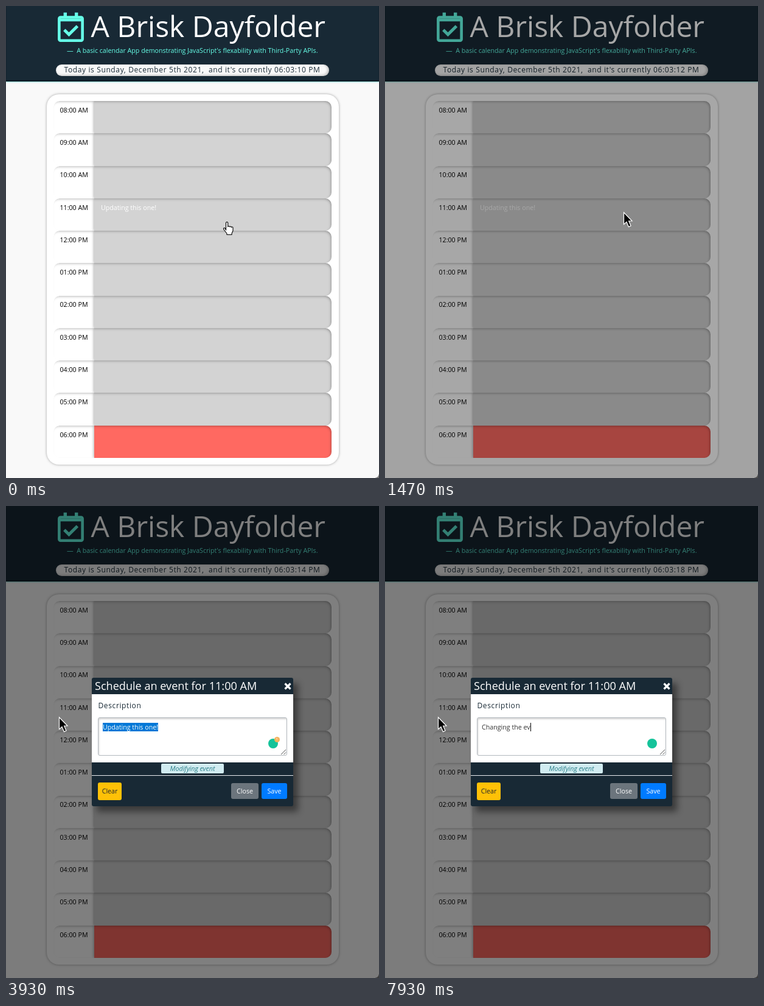
An HTML page that plays this animation: 613x775 px, repeating every 8 s.

```html
<!DOCTYPE html>
<html lang="en">
<head>
<meta charset="utf-8">
<title>A Brisk Dayfolder</title>
<style>
html, body { margin: 0; width: 100%; height: 100%; overflow: hidden; background: #f9f9f9; }
body { font: 10.667px "Open Sans", "Noto Sans", sans-serif; color: #000; }
div, .t, svg { position: absolute; box-sizing: border-box; }
.t { line-height: 0; white-space: pre; }
.mid { transform: translateX(-50%); }
.wide { letter-spacing: .62px; }
.firm { font-weight: 500; }
#stage { left: 0; top: 0; width: 613px; height: 775px; overflow: hidden; }
#head { left: 0; top: 0; width: 613px; height: 124px; background: #182935;
  box-shadow: inset 0 -2px 2px #0d1a23, 0 1px 2px #8fe3dc; }
#pill { left: 82px; top: 96px; width: 449px; height: 19px; border-radius: 10px; background: #f9f9f9;
  box-shadow: inset -2px -1px 4px rgba(0,0,0,.25); }
#card { left: 67px; top: 145px; width: 480px; height: 608px; border-radius: 20px; background: #fff;
  box-shadow: 0 0 4px rgba(0,0,0,.35); }
.row { left: 78px; width: 457px; height: 53.3px; border-radius: 10px; background: #fff; overflow: hidden; }
.slot { left: 67px; top: 0; right: 0; bottom: 0; background: #d3d3d3; box-shadow: -1px 0 4px rgba(0,0,0,.3); }
.row.now .slot { background: #ff6961; }
.edge { inset: 0; border-radius: 10px; box-shadow: inset -2px 2px 5px -2px rgba(0,0,0,.4); }
.row .t { color: #000; }
.row .memo { color: #fff; }
.row.on .t { margin: 1px 0 0 1px; color: #000; }
.row.on .edge { border: 1px solid #b4b6b6; box-shadow: none; }
#corner { right: 0; bottom: 0; width: 6px; height: 6px; background: radial-gradient(circle at 0 0, transparent 5px, #777 6px); }
#shade { inset: 0; background: #000; }
#modal { left: 141px; top: 282px; width: 331px; height: 211px; border-radius: 3px; background: #182935;
  box-shadow: 8px 9px 11px rgba(0,0,0,.45); }
#sheet { left: 0; top: 27px; width: 331px; height: 112px; background: #fff; }
#field { left: 10px; top: 65px; width: 311px; height: 63px; border: 1px solid #b3b9be; border-radius: 3px;
  box-shadow: inset 1px 2px 3px rgba(0,0,0,.18); }
#rule { left: 0; top: 160px; width: 331px; height: 1px; background: #e9ecef; }
#state { top: 141px; height: 16px; border-radius: 2px; background: #d1ecf1; }
#status { font-style: italic; }
.btn { border-radius: 3px; }
#dot { left: 289.5px; top: 99.5px; width: 16px; height: 16px; border-radius: 50%; background: #15c39a; }
#badge { left: 299.5px; top: 97px; width: 9px; height: 9px; border-radius: 50%; background: #f3b35d;
  color: #fff; font-size: 6px; line-height: 9px; text-align: center; }
#note b { font-weight: 400; color: #fff; background: #0078d7; }
#note i { position: absolute; top: -7px; width: 1px; height: 14px; background: #000; }
#cursor { left: 0; top: 0; overflow: visible; }
</style>
</head>
<body>
<div id="stage"></div>
<script>
const LOOP = 8000;
const stage = document.getElementById('stage');

function box(parent, id, cls = '') {
  const d = document.createElement('div');
  if (id) d.id = id;
  d.className = cls;
  parent.append(d);
  return d;
}

// Places text by its left edge (or centre) and baseline.
function text(parent, x, y, str, { size = 10.667, color = '', cls = '', id = '' } = {}) {
  const s = document.createElement('span');
  s.className = 't ' + cls;
  if (id) s.id = id;
  s.textContent = str;
  s.style.cssText = `left:${x}px;top:${y - size * .388}px;font-size:${size}px;` + (color && `color:${color}`);
  parent.append(s);
  return s;
}

function svg(parent, x, y, w, h, view, inner) {
  parent.insertAdjacentHTML('beforeend',
    `<svg style="left:${x}px;top:${y}px" width="${w}" height="${h}" viewBox="${view}" fill="none">${inner}</svg>`);
}

// Header
const MINT = '#66ffe8';
const head = box(stage, 'head');
svg(head, 85, 10, 43, 49, '0 0 448 512', `<g stroke="${MINT}" stroke-width="48">
  <rect x="24" y="88" width="400" height="400" rx="24"/><path d="M24 136H424"/>
  <path d="M128 8V90M320 8V90" stroke-width="56"/>
  <path d="M112 306L192 384L338 240" stroke-width="52"/></g>`);
text(head, 139.5, 52, 'A Brisk Dayfolder', { size: 48, color: '#fff' });
text(head, 100, 77, "—  A basic calendar App demonstrating JavaScript's flexability with Third-Party APIs.",
  { color: MINT, cls: 'firm' });
box(head, 'pill');
const clock = text(head, 95.5, 110, '', { size: 12, color: '#182935', cls: 'wide' });

// Hour rows
box(stage, 'card');
const rows = Array.from({ length: 11 }, (_, i) => {
  const h = i + 8;
  const row = box(stage, '', 'row' + (h === 18 ? ' now' : ''));
  row.style.top = 156 + i * 53.27 + 'px';
  box(row, '', 'slot');
  box(row, '', 'edge');
  const label = String(h > 12 ? h - 12 : h).padStart(2, '0') + ':00 ' + (h < 12 ? 'AM' : 'PM');
  text(row, 10.5, 19, label, { cls: 'firm' });
  if (h === 11) text(row, 78, 19, 'Updating this one!', { cls: 'memo' });
  return row;
});
box(stage, 'corner');

// Dialog
const shade = box(stage, 'shade');
const modal = box(stage, 'modal');
text(modal, 5, 20, 'Schedule an event for 11:00 AM', { size: 18.1, color: '#fff' });
svg(modal, 316, 8, 12, 12, '0 0 12 12', '<path d="M1.5 1.5L10.5 10.5M10.5 1.5L1.5 10.5" stroke="#fff" stroke-width="3.2"/>');
box(modal, 'sheet');
text(modal, 10.5, 51, 'Description', { size: 12, color: '#182935', cls: 'wide' });
box(modal, 'field');
svg(modal, 310, 117, 10, 10, '0 0 10 10', '<path d="M1 9L9 1M5.5 9L9 5.5" stroke="#555"/>');
const note = text(modal, 18, 85, '', { id: 'note' });
const dot = box(modal, 'dot');
const badge = box(modal, 'badge');
badge.textContent = '1';
const state = box(modal, 'state');
const status = text(modal, 165.5, 153, '', { id: 'status', cls: 'mid' });
box(modal, 'rule');

function button(x, y, w, h, label, bg, color) {
  const b = box(modal, '', 'btn');
  b.style.cssText = `left:${x}px;top:${y}px;width:${w}px;height:${h}px;background:${bg}`;
  text(modal, x + w / 2, 190, label, { color, cls: 'mid' });
}
button(10, 172, 39, 29, 'Clear', '#ffc107', '#212529');
button(229, 173, 45, 26, 'Close', '#6c757d', '#fff');
button(279, 173, 42, 26, 'Save', '#007bff', '#fff');

// Pointer shapes, drawn around their hot spot
svg(stage, 0, 0, 1, 1, '0 0 1 1', `<path fill="#fff" stroke="#000" stroke-width="1.1" stroke-linejoin="round"
  d="M-1.5 14V2.2a1.6 1.6 0 0 1 3.2 0V8.5a1.5 1.5 0 0 1 2.9.3a1.5 1.5 0 0 1 2.8.6a1.4 1.4 0 0 1 2.6.8V15l-2 4.5V21.5H0V19.5L-4 14.5L-5.5 12a1.5 1.5 0 0 1 2.5-1.2Z"/>
  <path d="M.5 1V20.5L5 16.5L8.4 24.6L12 23L8.6 15H14Z" fill="#000" stroke="#fff" stroke-width="1.2"/>
  <path d="M-4-9H-1L0-8L1-9H4M0-8V8M-4 9H-1L0 8L1 9H4" stroke="#000" stroke-width="1.8"/>`);
const cursor = stage.lastElementChild;
cursor.id = 'cursor';
const pointers = [...cursor.children];

const PATH = [
  [330, 363, 354], [400, 370, 372], [470, 378, 376], [530, 386, 372], [670, 392, 355], [730, 393, 350],
  [800, 393, 350], [930, 393, 343], [1000, 392, 338], [1530, 392, 338], [1600, 392, 340], [1700, 392, 340],
  [2470, 344, 382], [2930, 262, 366], [3000, 260, 365], [3600, 120, 351], [3800, 87, 346]
];
const TICKS = [400, 1400, 2400, 3400, 4330, 5330, 6330, 7330];
const KEYS = [4800, 5070, 5330, 5600, 5740, 5870, 6600, 6870, 7000, 7130, 7330, 7470, 7670, 7800, 7930];
const OLD = 'Updating this one!', NEW = 'Changing the ev';

const clamp = v => Math.min(1, Math.max(0, v));
const passed = (list, t) => list.filter(v => v <= t).length;
const show = (el, on) => { el.style.display = on ? '' : 'none'; };

function pointAt(t) {
  const i = PATH.findIndex(p => p[0] > t);
  if (i === 0) return PATH[0].slice(1);
  if (i < 0) return PATH[PATH.length - 1].slice(1);
  const [t0, x0, y0] = PATH[i - 1], [t1, x1, y1] = PATH[i];
  const p = (t - t0) / (t1 - t0);
  return [x0 + (x1 - x0) * p, y0 + (y1 - y0) * p].map(Math.round);
}

function noteHtml(t, x) {
  if (t < 1870) return 'This event is for...';
  if (t >= 4800) return NEW.slice(0, passed(KEYS, t)) + '<i></i>';
  if (t < 3000) return OLD;
  const cut = Math.round(clamp((x - 159) / 92) * OLD.length);
  return OLD.slice(0, cut) + '<b>' + OLD.slice(cut) + '</b>';
}

function draw(t) {
  const [x, y] = pointAt(t);
  const kind = t < 1000 ? 0 : t < 1540 || x < 141 ? 1 : 2;
  pointers.forEach((p, i) => show(p, i === kind));
  cursor.style.transform = `translate(${x}px,${y}px)`;

  clock.textContent = `Today is Sunday, December 5th 2021,  and it's currently 06:03:${10 + passed(TICKS, t)} PM`;
  rows[4].classList.toggle('on', t >= 400 && t < 600);
  rows[3].classList.toggle('on', t >= 600 && t < 1400);

  shade.style.opacity = clamp((t - 1367) / 150) * .5;
  modal.style.opacity = clamp((t - 1517) / 150);
  const slide = -33.3 * (1 - clamp((t - 1517) / 300)) ** 1.667;
  modal.style.transform = slide ? `translateY(${slide}px)` : '';

  const loaded = t >= 1870;
  note.innerHTML = noteHtml(t, x);
  note.style.color = loaded ? '#333' : '#868e96';
  status.textContent = loaded ? 'Modifying event' : 'Create new event';
  status.style.color = loaded ? '#2a7f88' : '#0b5aa8';
  state.style.left = (loaded ? 114 : 110) + 'px';
  state.style.width = (loaded ? 103 : 111) + 'px';
  show(dot, t >= 2000);
  show(badge, t >= 2270 && t < 4800);
}

// The screen refreshes 15 times a second.
function frame() {
  const t = performance.now() % LOOP;
  draw(Math.round(Math.floor((t + 4) * 3 / 200) * 20 / 3) * 10 % LOOP);
  requestAnimationFrame(frame);
}
frame();
</script>
</body>
</html>
```
